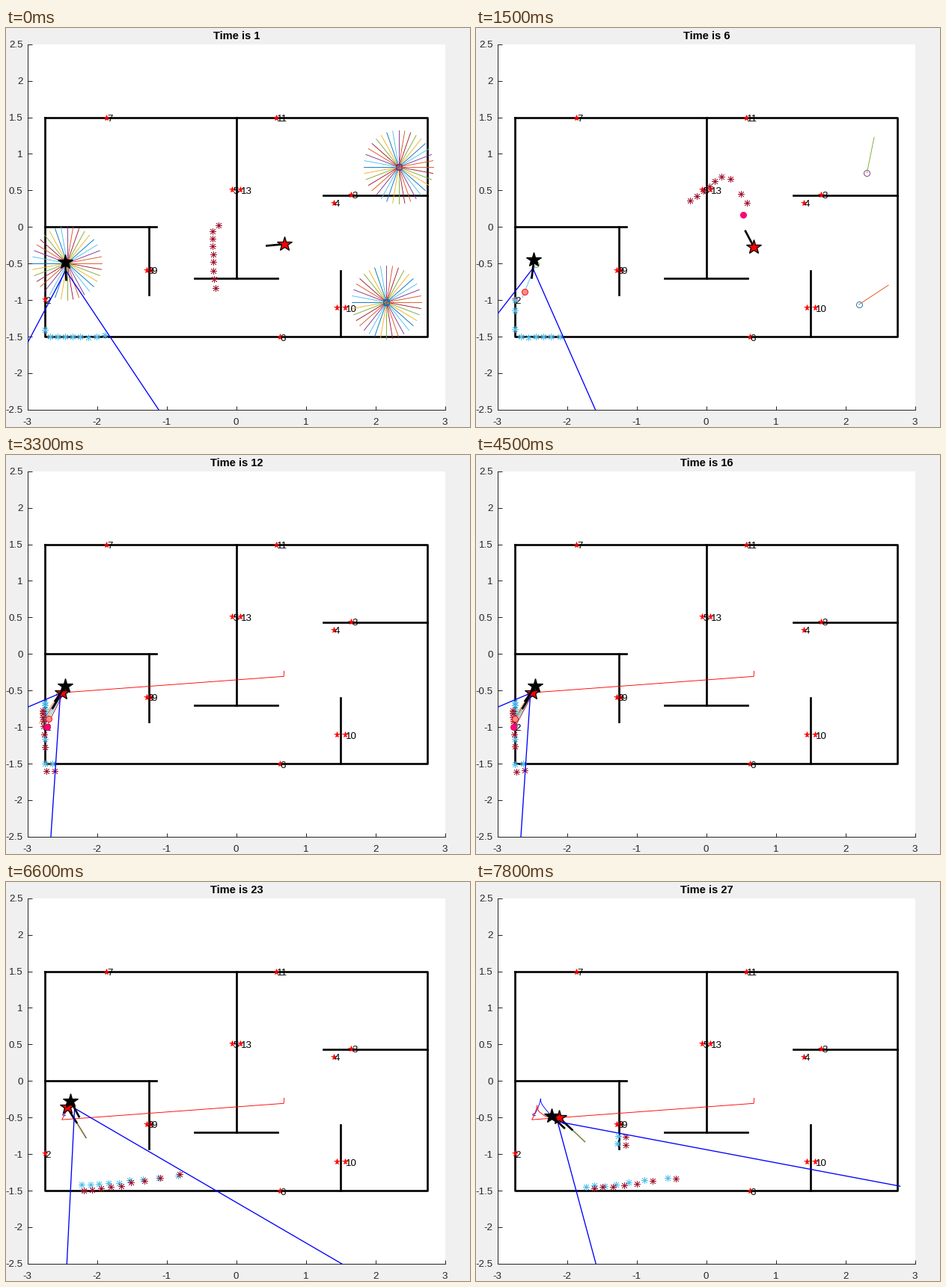
A matplotlib script that plays this animation: 620x534 px, repeating every 8 s.

```python
import numpy as np
import matplotlib.pyplot as plt
from matplotlib.animation import FuncAnimation

W, H, DPI = 620, 534, 64
STEPS = 27
CONVERGED = 10  # step at which a single cluster survives
plt.rcParams["font.family"] = "Liberation Sans"
plt.rcParams["axes.unicode_minus"] = False

COLORS = ["#0072BD", "#D95319", "#EDB120", "#7E2F8E", "#77AC30", "#4DBEEE", "#A2142F"]
SKY, WINE, INK = COLORS[5], COLORS[6], "#262626"

# Polylines as x list, y list
WALLS = [
    ([-2.75, 2.75, 2.75, -2.75, -2.75], [1.5, 1.5, -1.5, -1.5, 1.5]),
    ([0, 0], [1.5, -0.7]), ([-0.6, 0.6], [-0.7, -0.7]),
    ([-2.75, -1.15], [0, 0]), ([-1.25, -1.25], [0, -0.925]),
    ([1.25, 2.75], [0.43, 0.43]), ([1.5, 1.5], [-0.6, -1.5]),
]
LANDMARKS = {
    "2": (-2.75, -0.99), "3": (1.65, 0.445), "4": (1.40, 0.335),
    "5": (-0.06, 0.51), "13": (0.06, 0.51), "6": (0.625, -1.505),
    "7": (-1.865, 1.5), "11": (0.575, 1.5), "8": (-1.285, -0.585),
    "9": (-1.23, -0.585), "": (1.445, -1.105), "10": (1.565, -1.105),
}
# Start, drift, heading, turn per step, ring colour, line colour
CLUSTERS = [
    ((2.335, 0.82), (-0.045, -0.14), 173, -19, 3, 4),
    ((2.16, -1.03), (0.06, -0.055), 42, -2, 0, 1),
    ((-2.43, -0.495), (-0.03, -0.02), 277, -6, 4, 5),
]
FAN = 10 * np.arange(1, 37)


def px(n):
    """Pixels to points."""
    return n * 72 / DPI


def ease(step, start, end):
    u = np.clip((step - start) / (end - start), 0, 1)
    return u * u * (3 - 2 * u)


def true_pose(s):
    x = (-2.455 - 0.04 * np.sin(np.pi * min(s, 6) / 6)
         + 0.075 * ease(s, 17, 19) + 0.155 * ease(s, 22, 26))
    y = (-0.475 + 0.035 * ease(s, 0, 7) + 0.195 * ease(s, 17, 19.5)
         - 0.23 * ease(s, 21, 26))
    deg = (-87 - 39 * ease(s, 3, 9) + 65 * ease(s, 18, 21)
           + 21 * ease(s, 22, 27))
    return np.array([x, y, deg])


def cluster_pose(cluster, s):
    (x, y), (dx, dy), deg, turn = cluster[:4]
    moved = ease(s, 2, 7.5)
    return np.array([x + dx * moved, y + dy * moved, deg + turn * s])


def guess_pose(s):
    if s >= CONVERGED:
        late = ease(s, 24, 26)
        return true_pose(s) + (-0.05 + 0.16 * ease(s, 23, 26),
                               -0.09 + 0.065 * late, 4 - 3.5 * late)
    mean = np.mean([cluster_pose(c, s) for c in CLUSTERS], axis=0)
    if s == 0:
        mean[2] = FAN.mean()
    return mean


def ahead(x, y, deg, dist):
    a = np.radians(deg)
    return x + dist * np.cos(a), y + dist * np.sin(a)


def cast(ox, oy, deg):
    """Distance from a point to the nearest wall along a bearing."""
    dx, dy = ahead(0, 0, deg, 1)
    best = 5.0
    for xs, ys in WALLS:
        for x0, y0, ex, ey in zip(xs, ys, np.diff(xs), np.diff(ys)):
            den = dx * ey - dy * ex
            if abs(den) < 1e-9:
                continue
            qx, qy = x0 - ox, y0 - oy
            t, u = (qx * ey - qy * ex) / den, (qx * dy - qy * dx) / den
            if t > 0 and 0 <= u <= 1:
                best = min(best, t)
    return best


def scan(true, step):
    rng = np.random.default_rng(step)
    ox, oy = ahead(*true, 0.11)
    bearings = true[2] + 3 + np.linspace(-26.2, 26.2, 9)
    dist = np.array([cast(ox, oy, b) for b in bearings])
    dist -= 0.3 * np.maximum(dist - 1, 0)  # far ranges read short
    dist *= rng.normal(1, 0.006, 9) * (1 - 0.025 * ease(step, 17, 19))
    return ahead(ox, oy, bearings, dist)


def reframe(x, y, src, dst):
    """Carry points seen from pose src over to pose dst."""
    a = np.radians(dst[2] - src[2])
    dx, dy = x - src[0], y - src[1]
    return (dst[0] + dx * np.cos(a) - dy * np.sin(a),
            dst[1] + dx * np.sin(a) + dy * np.cos(a))


fig = plt.figure(figsize=(W / DPI, H / DPI), dpi=DPI, facecolor="#f0f0f0")
ax = fig.add_axes([28.6 / W, 23.2 / H, 558 / W, 489 / H])
ax.set(xlim=(-3, 3), ylim=(-2.5, 2.5))
xt, yt = np.arange(-3, 4), np.arange(-2.5, 2.6, 0.5)
ax.set_xticks(xt, [f"{v:g}" for v in xt])
ax.set_yticks(yt, [f"{v:g}" for v in yt])
ax.tick_params(direction="in", length=px(5.5), width=px(1), color=INK,
               labelcolor=INK, labelsize=px(13.33))
ax.tick_params(axis="x", pad=px(11))
ax.tick_params(axis="y", pad=px(6))
ax.spines[["top", "right"]].set_visible(False)
ax.spines[["left", "bottom"]].set(color=INK, linewidth=px(1))
title = fig.text(308 / W, 1 - 14.6 / H, "", ha="center", va="baseline",
                 weight="bold", size=px(14.67), color="black")

for xs, ys in WALLS:
    ax.plot(xs, ys, color="black", lw=px(2.67), zorder=2)
for name, spot in LANDMARKS.items():
    ax.plot(*spot, "*", color="red", ms=px(8), mew=px(0.67), zorder=3)
    ax.annotate(name, spot, xytext=(px(1), -px(5.5)), textcoords="offset points",
                va="baseline", size=px(13.33), color="black", zorder=3.1)

live = []


def draw(x, y, z=4, **style):
    live.extend(ax.plot(x, y, zorder=z, **style))


def ray(x, y, deg, dist, color, width, z=4):
    ex, ey = ahead(x, y, deg, dist)
    draw([x, ex], [y, ey], z, color=color, lw=px(width))


def disc(x, y, face, edge, z):
    draw(x, y, z, marker="o", mfc=face, mec=edge, ms=px(8), mew=px(0.9))


def particle(x, y, deg, ring, line):
    disc(x, y, "none", COLORS[ring % 7], 4)
    ray(x, y, deg, 0.5, COLORS[line % 7], 0.9)


def draw_particles(step, guess):
    if step >= CONVERGED:
        spread = 1 - ease(step, 10, 24)
        for k in (-2, -1, 1, 2, 0):
            offset = np.array([0.018, 0.008, 2]) * k * spread
            particle(*(guess + offset), k + 3, k + 4)
        return
    for cluster in CLUSTERS:
        x, y, deg = cluster_pose(cluster, step)
        ring, line = cluster[4:]
        if step > 0:
            particle(x, y, deg, ring, line)
            continue
        for k, spoke in enumerate(FAN):
            particle(x, y, spoke, ring, 2 * k + 1)


def draw_landmark_fix(step, true, guess):
    lx, ly = LANDMARKS["2"]
    ox, oy = ahead(*true, 0.12)
    bearing = np.degrees(np.arctan2(ly - oy, lx - ox))
    if abs(bearing - true[2]) < 31:
        x, y = lx + 0.11 - 0.014 * (step - 7), ly + 0.1
        disc(x, y, "#ff8c8c", "red", 5)
        disc(*reframe(x, y, true, guess), "#ff0080", "#f0004c", 5)


def draw_robot(pose, fill, z):
    ray(*pose, 0.25, "black", 2.67, z)
    draw(*pose[:2], z + 0.1, marker="*", mfc=fill, mec="black",
         ms=px(20), mew=px(1.3))


def update(i):
    while live:
        live.pop().remove()
    step = min(i // 3, STEPS - 1)
    title.set_text(f"Time is {step + 1}")
    true, guess = true_pose(step), guess_pose(step)

    draw_particles(step, guess)
    for pose_at, color in ((true_pose, "blue"), (guess_pose, "red")):
        trail = np.array([pose_at(s) for s in range(step + 1)])
        draw(trail[:, 0], trail[:, 1], 4.5, color=color, lw=px(0.9))

    apex = ahead(*true, 0.12)
    for side in (-32, 32):
        ray(*apex, true[2] + side, 5, "blue", 1.33, 6.5)

    hits = scan(true, step)
    for points, color in ((hits, SKY), (reframe(*hits, true, guess), WINE)):
        draw(*points, 4.8, ls="none", marker=(8, 2, 0), color=color,
             ms=px(9), mew=px(0.75))

    draw_landmark_fix(step, true, guess)
    draw_robot(guess, "red", 6)
    draw_robot(true, "black", 7)
    return live


anim = FuncAnimation(fig, update, frames=80, interval=100, repeat=True,
                     repeat_delay=0, init_func=lambda: update(0), blit=False)
plt.show()
```
